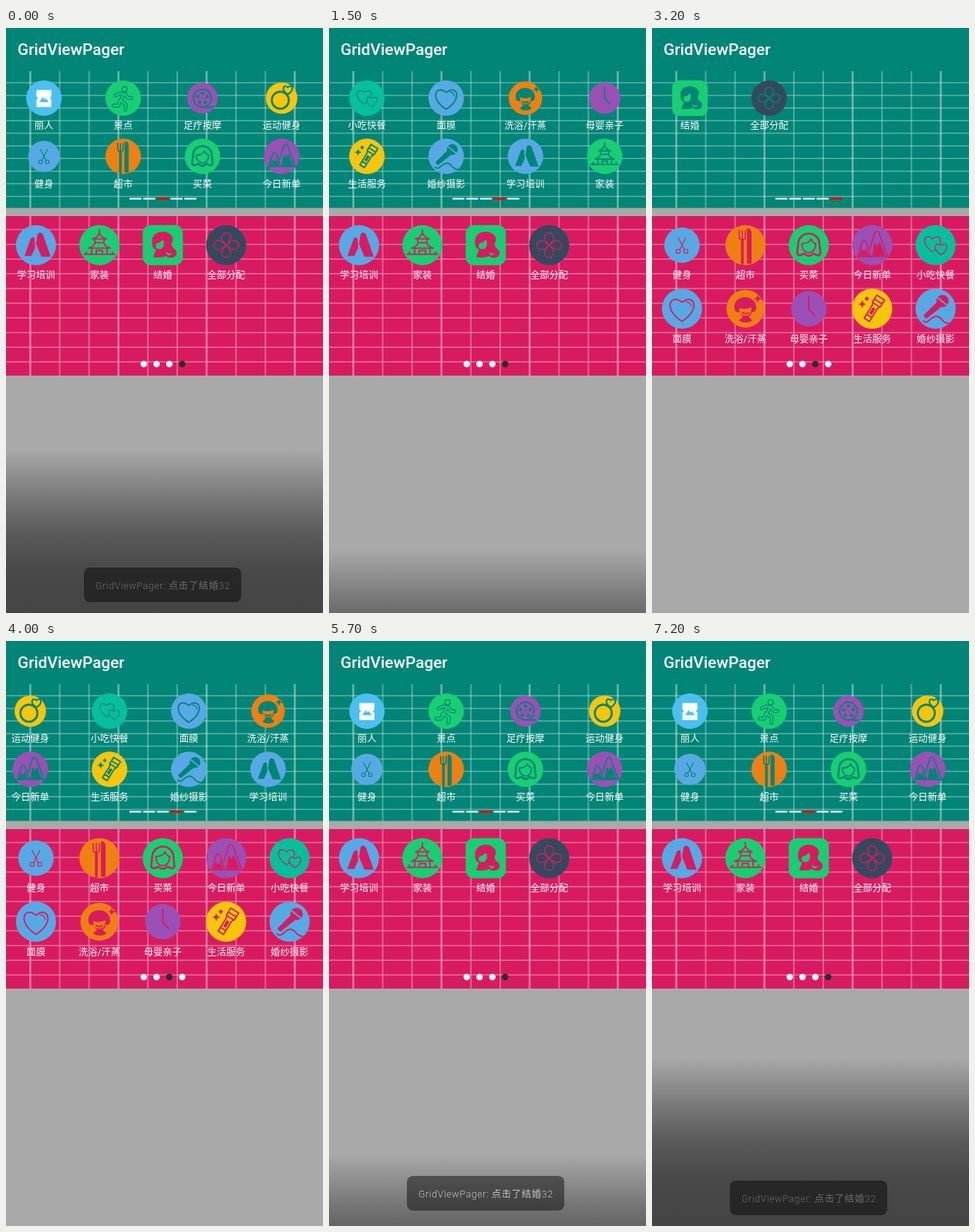
Recreate the animation shown at these times as an HTML page. Size 411 px wide and 759 px high, loop 7900 ms.

```html
<!DOCTYPE html>
<html lang="zh-CN">
<head>
<meta charset="utf-8">
<title>GridViewPager</title>
<style>
  html, body { margin: 0; width: 100%; height: 100%; overflow: hidden; background: #a9a9a9; }
  svg { display: block; width: 411px; height: 759px; }
  text { fill: #fff; font-family: Roboto, "Noto Sans CJK SC", "Noto Sans CJK", sans-serif; }
  .label { font-size: 12.3px; text-anchor: middle; }
  .glyph { fill: none; stroke: var(--bg); stroke-width: 1.8; stroke-linejoin: round; stroke-linecap: round; }
  .glyph path, .glyph circle { vector-effect: non-scaling-stroke; }
  .cut { fill: var(--bg); stroke: none; }
  #top { --bg: #008577; }
  #bottom { --bg: #d81b60; }
</style>
</head>
<body>
<svg viewBox="0 0 411 759">
  <defs>
    <linearGradient id="shade" x2="0" y2="1">
      <stop offset="0" stop-opacity="0"/>
      <stop offset=".3" stop-opacity=".3"/>
      <stop offset=".5" stop-opacity=".47"/>
      <stop offset=".72" stop-opacity=".57"/>
      <stop offset="1" stop-opacity=".6"/>
    </linearGradient>
  </defs>
  <rect width="411" height="759" fill="#a9a9a9"/>
  <rect width="411" height="57" fill="#008577"/>
  <text x="15" y="35" font-size="20.8" font-weight="500">GridViewPager</text>
  <g id="top"></g>
  <g id="bottom"></g>
  <g id="toast">
    <rect x="101" y="700" width="204" height="45" rx="8" fill="#5c5c5c"/>
    <text x="116" y="727.5" font-size="12.4" font-weight="300" letter-spacing=".6">GridViewPager: 点击了结婚32</text>
  </g>
  <rect id="overlay" y="540" width="411" height="220" fill="url(#shade)"/>
</svg>
<script>
const BLUE = '#57a9e4', GREEN = '#17cf72', PURPLE = '#9b50b5', ORANGE = '#ee8012', YELLOW = '#f7c50a';
const $ = id => document.getElementById(id);
const range = n => [...Array(n).keys()];

const line = (d, attrs = '') => `<path d="${d}" ${attrs}/>`;
const cut = d => `<path class="cut" d="${d}"/>`;
const fill = (d, color) => line(d, `fill="${color}" stroke="none"`);
const ring = (x, y, r, attrs = '') => `<circle cx="${x}" cy="${y}" r="${r}" ${attrs}/>`;
const heart = (x, y, s, attrs = '') =>
  line('M0 10C-17-1-9-14 0-6C9-14 17-1 0 10Z', `transform="translate(${x} ${y}) scale(${s})" ${attrs}`);
const hollow = (d, color) => line(d, 'stroke-width="4.8"') + line(d, `stroke="${color}" stroke-width="2.4"`);
const spark = (x, y, s) => cut(`M${x} ${y - s}l1.5 ${s - 1.5} ${s - 1.5} 1.5 ${1.5 - s} 1.5-1.5 ${s - 1.5}-1.5 ${1.5 - s} ${1.5 - s}-1.5 ${s - 1.5}-1.5z`);
// Copies of a shape turned evenly around the centre
const around = (n, shape) => range(n).map(i => `<g transform="rotate(${i * 360 / n})">${shape}</g>`).join('');

// label, disc colour, disc radius (0 for a rounded square), glyph
const FIRST = 16;
const items = [
  ['丽人', '#4bc0ee', 26,
    fill('M-11-12H11V-2a2 2 0 0 0 0 4V13H-11V2a2 2 0 0 0 0-4z', '#fff') + fill('M-7 6L-2-1 1 2 3 0 7 6z', '#4bc0ee')],
  ['景点', GREEN, 26,
    ring(2, -13, 3.8, 'stroke-width="1.4"') + hollow('M-11-4l6-3 8 1 4 6h5M1-5l-5 9 8 5-1 8M-5 4l-2 7h-7', GREEN)],
  ['足疗按摩', PURPLE, 22.5,
    ring(0, 0, 13) + around(5, ring(0, -7.5, 2.5, 'class="cut"')) + ring(0, 0, 1.2, 'class="cut"') + line('M4 13H15')],
  ['运动健身', YELLOW, 23,
    ring(-2, 3, 12.5, 'stroke-width="2.6"') + heart(9, -12, .65, `fill="${YELLOW}" stroke-width="2"`)],
  ['健身', BLUE, 23,
    `<g stroke-width="1.1">${line('M-5-10L3 6M5-10L-3 6')}${ring(-5, 8, 2.7)}${ring(5, 8, 2.7)}</g>`],
  ['超市', ORANGE, 26,
    line('M-8-19v8q0 4 4 4t4-4v-8M-4-19V-7', 'stroke-width="1.6"') + line('M-4-6V24', 'stroke-width="3.4"') + cut('M2-22q6 0 6 7V24H2z')],
  ['买菜', GREEN, 26,
    line('M-13 13c-4-1-1-6-1-13 0-20 28-20 28 0 0 7 3 12-1 13-4 1-5-2-7-2-4 4-8 4-12 0-2 0-3 3-7 2z', 'stroke-width="2.6"') +
    line('M-9-2c6 0 10-2 12-6 1 3 3 5 6 6 0 16-18 16-18 0z')],
  ['今日新单', PURPLE, 26,
    `<g stroke-width="1.6">${line('M-19 15L-13-4q2-4 5 0L-2 15zM-3 4L3-15q3-6 6 0L20 15H-2')}</g>` +
    cut('M-17 14L-14 5-10 8-8 4-4 14z') + cut('M0 14L3-3 7 1 10-4 17 14z')],
  ['小吃快餐', '#06bf9c', 26,
    heart(-4, -2, 1.05, 'stroke-width="1.3"') + heart(7, 5, .75, 'fill="#06bf9c" stroke-width="1.3"')],
  ['面膜', BLUE, 26, heart(0, 1, 1.55) + line('M5-9q6 0 7 6', 'stroke-width="1.3"')],
  ['洗浴/汗蒸', ORANGE, 24.5,
    cut('M-14 1c-4-20 28-22 28-2 0 4-3 6-6 5 0 4-2 5-4 6l5 5c-3 4-14 4-17 0l5-5c-2-1-4-3-4-6-4 1-6 0-7-3z') +
    fill('M-8-1q8 3 16-1 0 11-8 11t-8-10z', ORANGE) + line('M-4 5q4 3 8 0') + spark(16, -13, 5)],
  ['母婴亲子', PURPLE, 23, line('M0-16V1L8 9')],
  ['生活服务', YELLOW, 26,
    `<g transform="translate(2 0) rotate(32)">${line('M-6-17H6V-7L4-3V17H-4V-3L-6-7zM-6-11H6M-5-6H5M-4 11H4')}${cut('M-2-1H2V8H-2z')}</g>` +
    spark(-13, -6, 5) + spark(-7, -13, 3)],
  ['婚纱摄影', BLUE, 26,
    ring(9, -10, 8, 'class="cut"') + cut('M1-8L7-2-12 13-16 9z') +
    line('M3-14L14-5', `stroke="${BLUE}"`) + line('M-16 16c6 5 9-5 16-6 9-1 7 9 17 9')],
  ['学习培训', BLUE, 26, cut('M-15 14L-7-8q3-4 5-1L-1 3-6 14z') + cut('M2-14q3-5 7 0L19 15H7L0-2z')],
  ['家装', GREEN, 26,
    line('M0-20V-15M-9-8Q-2-10 0-16Q2-10 9-8zM-6-8V-3H6V-8M-14 4Q-6 1-6-3H6Q6 1 14 4zM-10 4V12M10 4V12M-4 12V7H4V12M-20 12H20M-17 9V12M17 9V12')],
  ['结婚', GREEN, 0,
    cut('M-14-5C-14-21 10-21 13-9c1 5-3 6-1 10 1 4 6 4 6 9 0 7-10 8-14 4-5 3-13 2-16 2 0-5 3-7 3-11-3 0-5-2-5-10z') +
    fill('M-9 2q-1-4 3-5 3 0 5-4 4 2 2 8-2 5-6 4-4 0-4-3z', GREEN) +
    line('M5 10q2 4 5 1', `stroke="${GREEN}"`)],
  ['全部分配', '#34495e', 26,
    around(4, line('M0 0C-3-4-6-6-6-10a6 6 0 0 1 12 0C6-6 3-4 0 0z', 'stroke-width="1.4"'))]
];

function cell([label, color, r, glyph], x, y, scale, gap) {
  const disc = r ? `<circle r="${r}" fill="${color}"/>` : `<rect x="-26" y="-26" width="52" height="52" rx="10" fill="${color}"/>`;
  return `<g transform="translate(${x} ${y}) scale(${scale})">${disc}<g class="glyph">${glyph}</g></g>
    <text class="label" x="${x}" y="${y + gap}">${label}</text>`;
}

// Fills a panel with its backdrop, pages and indicator; returns an updater.
function pager(id, p) {
  const bars = range(10).map(k =>
    `<path d="M${31.5 + 38.1 * k} ${p.y}v${p.h}" stroke-width="${k % 3 ? 2 : 2.6}" stroke-opacity="${k % 3 ? .3 : .4}"/>
     <path d="M0 ${p.y + p.h * (.085 + .0922 * k)}H411" stroke-width="1.5" stroke-opacity=".36"/>`).join('');
  const size = p.cols * 2;
  const cells = items.map((item, i) => {
    const n = i + FIRST, slot = n % size, width = 411 / p.cols;
    const x = Math.floor(n / size) * 411 + (slot % p.cols + .5) * width - 2.2;
    return cell(item, x, p.icon + Math.floor(slot / p.cols) * p.row, p.scale, p.gap);
  }).join('');
  $(id).innerHTML = `<rect y="${p.y}" width="411" height="${p.h}" fill="var(--bg)"/>
    <g stroke="#fff">${bars}</g><g>${cells}</g><g>${range(p.pages).map(p.mark).join('')}</g>`;
  const [, , pages, marks] = $(id).children;
  return (pos, active) => {
    pages.setAttribute('transform', `translate(${-411 * pos} 0)`);
    [...marks.children].forEach((m, i) => p.paint(m, i === active));
  };
}

const showTop = pager('top', {
  y: 56, h: 177.5, cols: 4, pages: 5, icon: 91, row: 75.5, scale: 46 / 52, gap: 40,
  mark: i => `<path d="M${160 + 17.8 * i} 221.5h15.6"/>`,
  paint(m, on) {
    m.setAttribute('stroke', on ? '#f00' : '#fff');
    m.setAttribute('stroke-width', on ? 3 : 2);
  }
});
const showBottom = pager('bottom', {
  y: 244, h: 207, cols: 5, pages: 4, icon: 281.7, row: 82.5, scale: 1, gap: 43.3,
  mark: i => `<circle cx="${178.6 + 16.6 * i}" cy="436" r="4.2"/>`,
  paint(m, on) { m.setAttribute('fill', on ? '#2d2d2d' : '#fff'); }
});

// Motion tracks: [time, value]
const TOP = [[1000, 2], [1100, 2.817], [1200, 2.96], [1300, 3], [1700, 3], [1800, 3.3], [1900, 3.75], [2000, 3.94], [2100, 4],
  [3300, 4], [3400, 3.7], [3500, 3.25], [3600, 3.05], [3700, 3], [3900, 3], [4000, 2.793], [4100, 2.25], [4200, 2.05], [4300, 2]];
const BOTTOM = [[2500, 3], [2600, 2.8], [2700, 2.3], [2800, 2.06], [2900, 2], [4300, 2], [4400, 2.25], [4500, 2.75], [4600, 2.95], [4700, 3]];
const TOP_MARK = [[0, 2], [1200, 3], [1900, 4], [3500, 3], [4100, 2]];
const BOTTOM_MARK = [[0, 3], [2700, 2], [4500, 3]];
const SHADE = [[0, 6], [1000, 6], [1100, 25], [1800, 220], [4200, 220], [4700, 126], [6600, 124], [7200, 0]];
const TOAST_Y = [[0, 0], [5200, 0], [5300, -6], [5800, -6], [6300, 0]];
const TOAST_ALPHA = [[1000, 1], [1100, 0], [5200, 0], [5500, 1]];

const step = (track, t) => track.filter(k => k[0] <= t).pop()[1];
function at(track, t) {
  const i = track.findIndex(k => k[0] > t);
  if (i < 0) return track[track.length - 1][1];
  if (!i) return track[0][1];
  const [t0, a] = track[i - 1], [t1, b] = track[i];
  return a + (b - a) * (t - t0) / (t1 - t0);
}

const start = performance.now();
function draw() {
  // The picture advances in steps of 100 ms.
  const t = Math.floor((performance.now() - start) % 7900 / 100) * 100;
  showTop(at(TOP, t), step(TOP_MARK, t));
  showBottom(at(BOTTOM, t), step(BOTTOM_MARK, t));
  $('toast').setAttribute('transform', `translate(0 ${at(TOAST_Y, t)})`);
  $('toast').setAttribute('opacity', at(TOAST_ALPHA, t));
  $('overlay').setAttribute('transform', `translate(0 ${at(SHADE, t)})`);
  requestAnimationFrame(draw);
}
draw();
</script>
</body>
</html>
```
